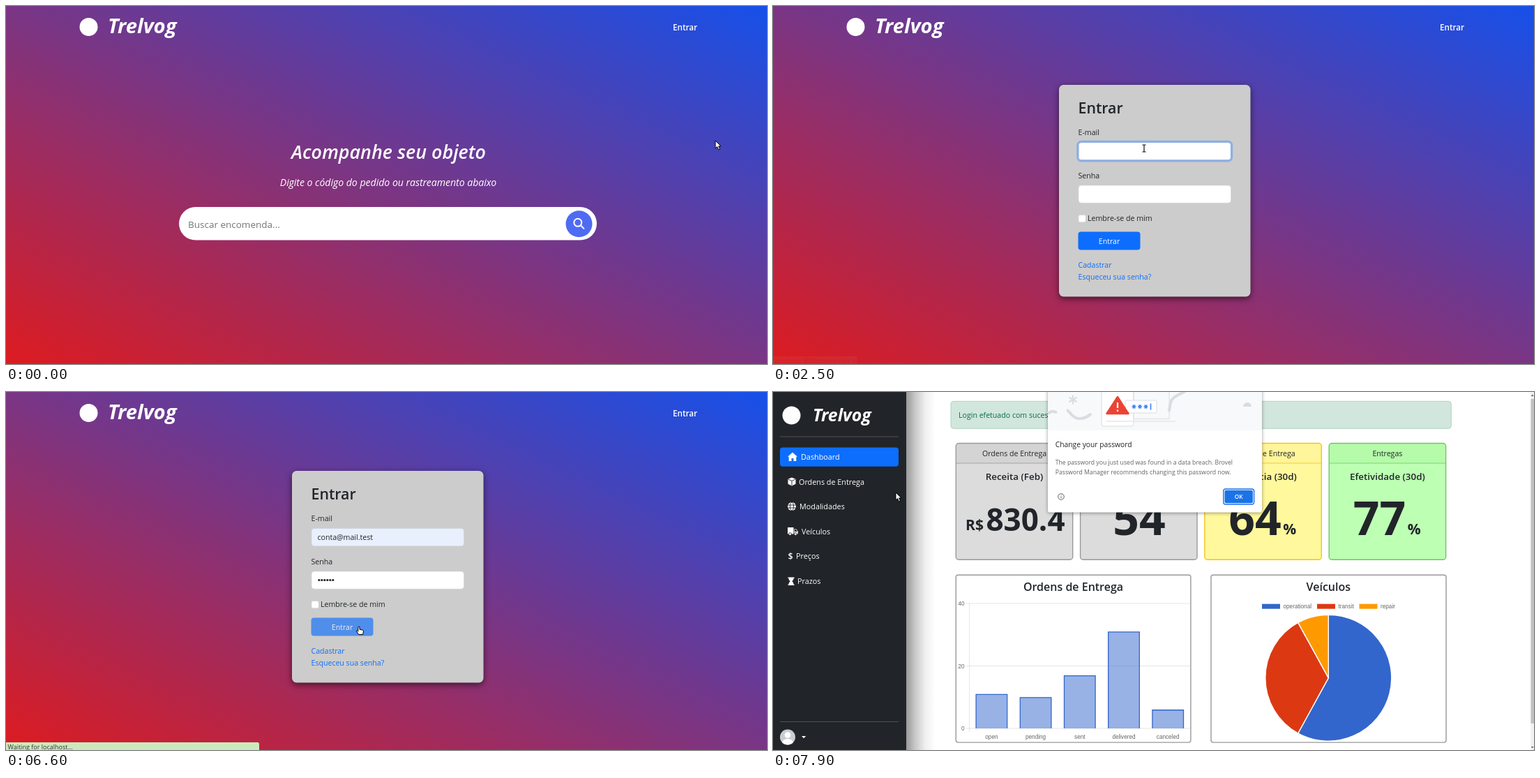
These frames come from a looping animation (1091x513 px, 8 s). An HTML page:

```html
<!DOCTYPE html>
<html lang="pt-BR">
<head>
<meta charset="utf-8">
<title>Trelvog</title>
<style>
html, body { margin: 0; width: 100%; height: 100%; overflow: hidden; background: #fff; }
svg { display: block; width: 100vw; height: 100vh; }
text { font-family: "Open Sans", "Noto Sans", sans-serif; font-size: 10.6px; fill: #212529; white-space: pre; }
.medium { font-weight: 600; }
.bold { font-weight: 700; }
.brand { font-weight: 700; font-style: italic; }
.mid { text-anchor: middle; }
.white { fill: #fff; }
.link { fill: #0d6efd; }
.chart text { font: 8.2px "Liberation Sans", Arial, sans-serif; fill: #666; }
.shadow { filter: drop-shadow(0 3px 5px rgba(0, 0, 0, .55)); }
.popup { filter: drop-shadow(0 1px 2.5px rgba(0, 0, 0, .4)); }
.field { fill: #fff; stroke: #ced4da; stroke-width: .7; }
.ring { fill: none; stroke: #0d6efd; stroke-opacity: .32; stroke-width: 3.4; }
.art { fill: none; stroke: #dadce0; }
.arrow, .hand { fill: #fff; stroke: #000; stroke-width: 1; stroke-linejoin: round; }
</style>
</head>
<body>
<svg id="stage" viewBox="0 0 1091 513" preserveAspectRatio="none">
  <defs>
    <linearGradient id="sky" x1="0" y1="1" x2="1" y2="0">
      <stop offset="0" stop-color="#dd1b20"/><stop offset="1" stop-color="#1650e9"/>
    </linearGradient>
    <linearGradient id="shade">
      <stop offset="0" stop-color="#000" stop-opacity=".4"/>
      <stop offset=".3" stop-color="#000" stop-opacity=".22"/>
      <stop offset=".65" stop-color="#000" stop-opacity=".06"/>
      <stop offset="1" stop-color="#000" stop-opacity="0"/>
    </linearGradient>
  </defs>

  <g id="site">
    <rect width="1091" height="513" fill="url(#sky)"/>
    <circle cx="118.5" cy="30" r="13" fill="#fff"/>
    <text class="brand white" x="146" y="39" style="font-size:29.2px">Trelvog</text>
    <text class="medium white" x="956" y="35" style="font-size:11.7px">Entrar</text>

    <g id="search">
      <text class="medium white mid" x="548.5" y="219" style="font-size:26.9px;font-style:italic">Acompanhe seu objeto</text>
      <text class="white mid" x="548" y="258" style="font-size:14.1px;font-style:italic">Digite o código do pedido ou rastreamento abaixo</text>
      <rect x="248" y="288" width="599" height="47.6" rx="23.8" fill="#fff"/>
      <text x="261" y="317.5" style="font-size:13.5px;fill:#757575">Buscar encomenda...</text>
      <circle cx="821.5" cy="312.2" r="19" fill="#4f6bf2"/>
      <g fill="none" stroke="#fff" stroke-width="2" stroke-linecap="round">
        <circle cx="819.8" cy="310.3" r="5.5"/><path d="M824 314.5l4.4 4.4"/>
      </g>
    </g>

    <g id="login">
      <rect class="shadow" x="410" y="113" width="274.5" height="303.5" rx="6.5" fill="#ccc"/>
      <text class="medium" x="437.5" y="154" style="font-size:21.3px">Entrar</text>
      <text x="437.5" y="185">E-mail</text>
      <rect id="email" class="field" x="438" y="195.5" width="218.5" height="25.3" rx="4"/>
      <text id="address" x="446.5" y="212">conta@mail.test</text>
      <text x="437.5" y="247">Senha</text>
      <rect class="field" x="438" y="257" width="218.5" height="25.3" rx="4"/>
      <g id="dots"></g>
      <path id="caret" d="M0 264v11" stroke="#222" stroke-width=".9"/>
      <rect id="emailRing" class="ring" x="437" y="194.5" width="220.5" height="27.3" rx="5"/>
      <rect id="passRing" class="ring" x="437" y="256" width="220.5" height="27.3" rx="5"/>
      <rect class="field" x="438" y="299.5" width="10.3" height="10.3" rx="2"/>
      <text x="451" y="308.3">Lembre-se de mim</text>
      <rect id="buttonRing" class="ring" x="436.5" y="322.5" width="91.5" height="28.5" rx="5"/>
      <g id="button">
        <rect id="buttonFace" x="437.5" y="323.5" width="89" height="26" rx="4"/>
        <text class="white mid" x="482" y="340.5">Entrar</text>
      </g>
      <text class="link" x="437.5" y="375.3">Cadastrar</text>
      <text class="link" x="437.5" y="391.7">Esqueceu sua senha?</text>
    </g>
  </g>

  <g id="dashboard">
    <rect width="1091" height="513" fill="#fff"/>
    <rect x="191" width="42" height="513" fill="url(#shade)"/>
    <rect width="191" height="513" fill="#212529"/>
    <circle cx="26.5" cy="33.5" r="13" fill="#fff"/>
    <text class="brand white" x="57" y="42" style="font-size:24.8px">Trelvog</text>
    <path d="M10 64h170M10 472.5h170" stroke="#585c60" stroke-width=".8"/>
    <rect x="10" y="79.5" width="170" height="27.3" rx="4" fill="#0d6efd"/>
    <g id="menu"></g>
    <g fill="#fff">
      <path d="M28 86.5l7 6.3h-1.7V99h-3.8v-4h-3v4h-3.8v-6.2H21z"/>
      <path d="M27 122.5l5.5 2.3v7L27 134.5l-5.5-2.7v-7z"/>
      <circle cx="27" cy="164" r="6"/>
      <path d="M21 194h8.5v9.5H21zM30.3 196.5h3l2.4 3v4h-5.4z"/>
      <path d="M21.5 265.5h9v1.4h-1c0 2-1 3.3-2.4 4.4 1.4 1 2.4 2.4 2.4 4.4h1v1.4h-9v-1.4h1c0-2 1-3.4 2.4-4.4-1.4-1.1-2.4-2.4-2.4-4.4h-1z"/>
    </g>
    <g fill="none" stroke="#212529" stroke-width=".9">
      <path d="M22 125.2l5 2.2 5-2.2M27 127.4v6.5"/>
      <ellipse cx="27" cy="164" rx="2.6" ry="6"/><path d="M21 162h12M21 166h12"/>
      <path d="M31.3 197.6h1.6l1.5 2h-3.1z" fill="#212529"/>
      <circle cx="24.5" cy="203.6" r="1.9" fill="#fff"/><circle cx="32.3" cy="203.6" r="1.9" fill="#fff"/>
    </g>
    <text class="white medium" x="21.5" y="239.5" style="font-size:12.5px">$</text>
    <clipPath id="round"><circle cx="21" cy="494.5" r="11"/></clipPath>
    <g clip-path="url(#round)">
      <rect x="10" y="483" width="22" height="23" fill="#c9cdd2"/>
      <circle cx="21" cy="491.5" r="4.3" fill="#fff"/><ellipse cx="21" cy="503" rx="8" ry="6" fill="#fff"/>
    </g>
    <path d="M41 493h6.2l-3.1 3.3z" fill="#fff"/>

    <rect x="255" y="13.3" width="717.3" height="39" rx="4" fill="#d1e7dd" stroke="#a9cfbd" stroke-width=".9"/>
    <text x="266" y="37" style="fill:#0a6b45">Login efetuado com sucesso.</text>
    <g id="cards"></g>

    <g fill="#fff" stroke="#999" stroke-width="1.4">
      <rect x="262.3" y="262.3" width="336.6" height="239.8" rx="3"/>
      <rect x="628" y="262.3" width="337" height="239.8" rx="3"/>
    </g>
    <text class="medium mid" x="430.5" y="285" style="font-size:16px">Ordens de Entrega</text>
    <text class="medium mid" x="796.3" y="285" style="font-size:16px">Veículos</text>
    <g id="bars" class="chart"></g>
    <g id="pie" class="chart"></g>

    <rect x="1086" width="5" height="513" fill="#f1f1f1"/>
    <rect x="1086.5" y="10" width="4.5" height="465" fill="#c1c1c1"/>
    <path d="M1086.7 6l2-2.5 2 2.5zM1086.7 508l2 2.5 2-2.5z" fill="#666"/>

    <g id="popup">
      <rect class="popup" x="394" y="-8" width="307" height="180.5" rx="3" fill="#fff"/>
      <rect x="394" width="307" height="55" fill="#f8f9fa"/>
      <g class="art" stroke-width="1">
        <path d="M430 4.5v13M424.4 7.8l11.2 6.5M424.4 14.3l11.2-6.5" stroke-width="2.2"/>
        <path d="M394 31q7-6 13-1M421 26c5 1 7 11 17 12q10 1 18-7" stroke-width="4"/>
        <rect x="471" y="-6" width="46" height="55" rx="3" fill="#fff"/>
        <path d="M517-2h51v40.5h-51zM478 42h99"/>
        <path d="M567 28c3-4 1-12 5-17 5-7 12-7 20-13" stroke-width="4"/>
        <rect x="505" y="12" width="45" height="18" rx="1.5" fill="#fff"/>
        <path d="M674 21a6 6 0 0 1 12 0z" fill="#dadce0" stroke="none"/>
      </g>
      <path d="M494 7l15.5 24h-31z" fill="#ea4335" stroke="#ea4335" stroke-width="2.5" stroke-linejoin="round"/>
      <path d="M494 15v8M494 25.5v2.5" stroke="#fff" stroke-width="2.2"/>
      <g id="stars" fill="none" stroke="#4285f4" stroke-width="1.7"><path d="M541.5 16.5v9"/></g>
      <text x="404.7" y="78.5" style="font-size:10.3px">Change your password</text>
      <text x="404.7" y="103.7" style="font-size:8.7px;fill:#5f6368">The password you just used was found in a data breach. Brovel</text>
      <text x="404.7" y="118" style="font-size:8.7px;fill:#5f6368">Password Manager recommends changing this password now.</text>
      <g fill="none" stroke="#5f6368"><circle cx="413" cy="150" r="4.3"/><path d="M413 149.3v3M413 147.2v1"/></g>
      <rect x="645.8" y="139" width="43.8" height="22" rx="3" fill="#fff" stroke="#1a73e8" stroke-width="1.4"/>
      <rect x="647.5" y="140.7" width="40.4" height="18.6" rx="2" fill="#1a73e8"/>
      <text class="medium white mid" x="667.7" y="153" style="font-size:8.3px">OK</text>
    </g>
  </g>

  <rect id="progress" height="1.8" fill="#0076ff"/>
  <g id="status">
    <path id="statusBox" fill="#cbe9bd"/>
    <text id="statusText" x="2.5" y="512" style="font-size:9px;fill:#333"></text>
  </g>

  <g id="cursor">
    <path class="arrow" d="M0 0v11l2.6-2.4 1.9 4.3 2-.9-1.9-4.1h3.5z"/>
    <path class="hand" d="M-1.2.8q1.2-1.6 2.2 0v3.4l4.4 1q1.2.4 1 1.8l-.7 4.5h-6L-3.6 7q-.2-1.4 1.2-1l1.2 1.2z"/>
    <g class="ibeam" fill="none" stroke-linecap="square">
      <path d="M-2-5h4M-2 5h4M0-5V5" stroke="#fff" stroke-width="2.6"/>
      <path d="M-2-5h4M-2 5h4M0-5V5" stroke="#111" stroke-width="1.2"/>
    </g>
  </g>
</svg>
<script>
const $ = id => document.getElementById(id);
const add = (id, markup) => $(id).insertAdjacentHTML('beforeend', markup);
const show = (el, on) => { el.style.display = on ? '' : 'none'; };

// Static parts built from short lists
[['Dashboard', 40], ['Ordens de Entrega', 37], ['Modalidades', 38], ['Veículos', 41], ['Preços', 33], ['Prazos', 35]]
  .forEach(([label, x], i) => add('menu', `<text class="white" x="${x}" y="${97 + i * 35.6}" style="font-size:10.8px">${label}</text>`));

const grey = ['#d4d4d4', '#dcdcdc', '#999'];
const yellow = ['#fff59a', '#fff89c', '#f3c414'];
const green = ['#b5fbaa', '#bdffb3', '#6ac95c'];
[['Ordens de Entrega', 'Receita (Feb)', grey], ['Ordens de Entrega', 'Total (30d)', grey],
 ['Ordens de Entrega', 'Eficiência (30d)', yellow], ['Entregas', 'Efetividade (30d)', green]]
  .forEach(([head, title, [top, body, line]], i) => {
    const x = 262.3 + i * 178.3, c = x + 83.7;
    add('cards', `<rect x="${x}" y="73.5" width="167.4" height="166.8" rx="4" fill="${body}"/>
      <path d="M${x} 102V77.5q0-4 4-4h159.4q4 0 4 4V102z" fill="${top}"/>
      <path d="M${x} 102h167.4" stroke="${line}" stroke-width=".8"/>
      <rect x="${x}" y="73.5" width="167.4" height="166.8" rx="4" fill="none" stroke="${line}" stroke-width="1.4"/>
      <text class="mid" x="${c}" y="92">${head}</text>
      <text class="medium mid" x="${c}" y="126" style="font-size:13.4px">${title}</text>`);
  });
[['R$', 289, 198, 21], ['830.4', 362, 199, 44], ['54', 525, 205, 66], ['64', 691, 205, 66],
 ['%', 740.7, 203.5, 21], ['77', 869.5, 205, 66], ['%', 919.3, 203.5, 21]]
  .forEach(([label, x, y, size]) =>
    add('cards', `<text class="bold mid" x="${x}" y="${y}" style="font-size:${size}px">${label}</text>`));

const level = value => 482 - value * 4.475;
[0, 20, 40].forEach(v => add('bars', `<path d="M277 ${level(v)}H598" stroke="#000" stroke-opacity=".13" stroke-width=".8"/>
  <text text-anchor="end" x="274.5" y="${level(v) + 3}">${v}</text>`));
add('bars', '<path d="M281.7 303v184" stroke="#000" stroke-opacity=".13" stroke-width=".8"/>');
[['open', 11], ['pending', 10], ['sent', 17], ['delivered', 31], ['canceled', 6]].forEach(([label, v], i) => {
  const c = 313.4 + i * 63.2;
  add('bars', `<path d="M${c - 22.3} 482V${level(v) + .6}h44.6V482" fill="#36c" fill-opacity=".5" stroke="#36c" stroke-width="1.3"/>
    <text class="mid" x="${c}" y="496.5">${label}</text>`);
});

const rim = turn => {
  const a = turn * 2 * Math.PI;
  return `${796.3 + 90.5 * Math.sin(a)} ${409.7 - 90.5 * Math.cos(a)}`;
};
[['operational', '#36c', 0, .58, 701], ['transit', '#dc3912', .58, .92, 780], ['repair', '#f90', .92, 1, 840.5]]
  .forEach(([label, color, from, to, x]) => add('pie', `
    <path d="M796.3 409.7L${rim(from)}A90.5 90.5 0 ${+(to - from > .5)} 1 ${rim(to)}z" fill="${color}" stroke="#fff" stroke-width="1.4"/>
    <rect x="${x}" y="303.7" width="26" height="7" fill="${color}"/>
    <text x="${x + 30.5}" y="309.7">${label}</text>`));

for (let i = 0; i < 6; i++) add('dots', `<circle cx="${448.8 + i * 4}" cy="269.5" r="1.6" fill="#222"/>`);
[517.5, 526, 534.5].forEach(x => add('stars', `<path d="M${x - 3} 21h6M${x - 1.5} 18.4l3 5.2M${x - 1.5} 23.6l3-5.2"/>`));

// Timeline: [time, x, y, shape]
const path = [
  [0, 1017, 193, 'arrow'], [400, 1017, 193, 'arrow'], [700, 1004, 110, 'arrow'], [900, 980, 40, 'arrow'],
  [1000, 972, 16, 'arrow'], [1100, 967, 25, 'hand'], [1300, 971, 36, 'hand'], [2000, 971, 36, 'hand'],
  [2200, 850, 90, 'arrow'], [2400, 570, 190, 'arrow'], [2500, 532, 204, 'ibeam'], [4700, 532, 204, 'ibeam'],
  [4800, 516, 272, 'ibeam'], [5500, 516, 272, 'ibeam'], [5700, 529, 300, 'arrow'], [5900, 506, 336, 'hand'],
  [6600, 506, 336, 'hand'], [6700, 504, 335, 'arrow'], [7600, 504, 335, 'arrow'], [7900, 176, 144, 'arrow'], [8000, 176, 144, 'arrow']
];
const progress = [[6700, 8, 1], [6800, 500, 1], [6900, 850, 1], [7000, 1091, 1], [7100, 1091, .5], [7200, 0, 0]];
const opacity = [[0, 0], [1200, 1], [2400, .5], [2500, .05], [4800, 0], [6600, 1], [7200, .6], [7300, .3], [7400, 0]];
const typed = [[0, 0], [4800, 3], [5000, 4], [5300, 5], [5500, 6]];
const face = [[0, '#0d6efd'], [5900, '#0b5ed7'], [6100, '#0a58ca'], [6400, '#0d6efd']];
const last = (steps, t) => steps.filter(s => s[0] <= t).pop();

function moveCursor(t) {
  const i = path.findIndex(p => p[0] > t);
  const [t0, x0, y0, shape] = path[i - 1], [t1, x1, y1] = path[i];
  const k = (t - t0) / (t1 - t0);
  $('cursor').setAttribute('transform', `translate(${x0 + (x1 - x0) * k} ${y0 + (y1 - y0) * k})`);
  for (const el of $('cursor').children) show(el, el.classList.contains(shape));
}

function draw(now) {
  const t = Math.floor(now % 8000 / 100) * 100;
  const within = (a, b) => t >= a && t < b;

  show($('site'), t < 6700);
  show($('search'), t < 1800);
  show($('login'), t >= 1800);
  show($('dashboard'), t >= 6700);
  show($('popup'), t >= 7500);

  const count = last(typed, t)[1];
  [...$('dots').children].forEach((dot, i) => show(dot, i < count));
  show($('address'), t >= 4800);
  $('email').style.fill = t >= 4800 ? '#e8f0fe' : '#fff';
  show($('emailRing'), t < 4800);
  show($('passRing'), within(4800, 6100));
  show($('caret'), within(4800, 6100));
  $('caret').setAttribute('transform', `translate(${447 + count * 4} 0)`);
  show($('buttonRing'), within(6100, 6400));
  $('buttonFace').style.fill = last(face, t)[1];
  $('button').style.opacity = t >= 6400 ? .65 : 1;

  const waiting = within(1700, 1900) || t >= 6600;
  $('status').style.opacity = last(opacity, t)[1];
  $('statusText').textContent = waiting ? 'Waiting for localhost...' : 'localhost:3000/users/sign_in';
  $('statusBox').setAttribute('d', `M0 502h${t >= 6600 ? 360.5 : 118.5}q2.5 0 2.5 2.5V513H0z`);

  const [, width, alpha] = last(progress, t) || [0, 0, 0];
  $('progress').setAttribute('width', width);
  $('progress').style.opacity = alpha;

  moveCursor(t);
}

const start = performance.now();
function tick() {
  draw(performance.now() - start);
  requestAnimationFrame(tick);
}
tick();
</script>
</body>
</html>
```
